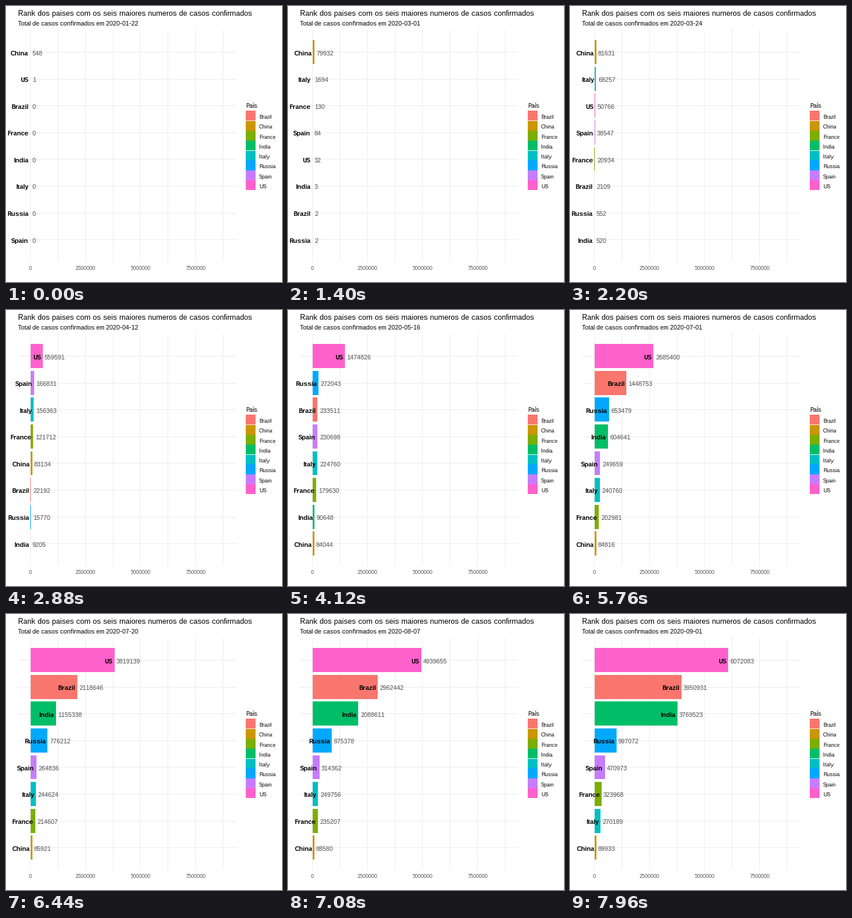
A matplotlib script for the animation above (8 s loop, 480 by 480 pixels).

```python
import numpy as np
import matplotlib as mpl
import matplotlib.pyplot as plt
from matplotlib.animation import FuncAnimation
from matplotlib.patches import Rectangle

mpl.rcParams["font.family"] = ["Liberation Sans", "DejaVu Sans"]
mpl.rcParams["text.hinting"] = "native"
mpl.rcParams["text.hinting_factor"] = 1

SIZE = 480
FRAMES = 200
LAST_DAY = 223
START = np.datetime64("2020-01-22")

# Cumulative counts on a few days; growth is exponential in between.
DAYS = [0, 9, 22, 34, 39, 46, 53, 60, 67, 74, 81, 98, 115, 138, 161, 180, 198, 223]
COUNTS = {
    "Brazil": [0, 0, 0, 0, 2, 20, 162, 1593, 4256, 11130, 22192, 79685,
               233511, 707412, 1448753, 2118646, 2962442, 3950931],
    "China": [548, 9802, 59895, 77754, 79932, 80823, 81003, 81435, 82122,
              82602, 83134, 83944, 84044, 84195, 84816, 85921, 88580, 89933],
    "France": [0, 5, 11, 14, 130, 1126, 4513, 16044, 40708, 71412, 121712,
               166543, 179630, 191313, 202981, 214607, 235207, 323968],
    "India": [0, 1, 3, 3, 3, 39, 113, 396, 1024, 3588, 9205, 33062, 90648,
              265928, 604641, 1155338, 2088611, 3769523],
    "Italy": [0, 2, 3, 322, 1694, 7375, 24747, 59138, 97689, 128948, 156363,
              203591, 224760, 235278, 240760, 244624, 249756, 270189],
    "Russia": [0, 2, 2, 2, 2, 17, 63, 367, 1534, 5389, 15770, 99399, 272043,
               476043, 653479, 776212, 875378, 997072],
    "Spain": [0, 0, 2, 6, 84, 673, 7798, 28768, 80110, 131646, 166831,
              212917, 230698, 241717, 249659, 264836, 314362, 470973],
    "US": [1, 8, 13, 15, 32, 518, 3499, 33746, 140909, 337573, 559591,
           1039909, 1474826, 1960642, 2685400, 3819139, 4939655, 6072083],
}
COLORS = dict(zip(COUNTS, ["#F8766D", "#CD9600", "#7CAE00", "#00BE67",
                           "#00BFC4", "#00A9FF", "#C77CFF", "#FF61CC"]))

X0 = 42.5
PX = 95.7 / 2.5e6
ROW0, ROW = 80.3, 46.55
BAR = 41.9
GRID = "#EBEBEB"
GREY = "#4D4D4D"

fig = plt.figure(figsize=(SIZE / 72, SIZE / 72), dpi=72, facecolor="white")
ax = fig.add_axes([0, 0, 1, 1])
ax.set_xlim(0, SIZE)
ax.set_ylim(SIZE, 0)
ax.axis("off")


def box(x, y, w, h, color, z=1):
    return ax.add_patch(Rectangle((x, y), w, h, fc=color, lw=0, zorder=z,
                                  antialiased=False))


def label(x, y, s, size, color="black", **kw):
    return ax.text(x, y, s, fontsize=size, color=color, va="baseline",
                   zorder=5, **kw)


def row_y(i):
    return ROW0 + ROW * i


# Grid and axis
for i in range(8):
    box(21, round(row_y(i)), 379, 1, GRID)
for i in range(8):
    box(int(X0 + i * 1.25e6 * PX), 41, 1, 404, GRID)
for i in range(4):
    label(X0 + i * 2.5e6 * PX, 459, str(i * 2500000), 9, GREY, ha="center")

# Titles and legend
label(21, 17, "Rank dos paises com os seis maiores numeros de casos confirmados", 13)
subtitle = label(21, 34, "", 11)
label(417, 177, "País", 11)
for i, (name, color) in enumerate(COLORS.items()):
    top = 182 + 17.28 * i
    box(417, round(top), 17, round(top + 17.28) - round(top), color)
    label(440, round(top + 14), name, 9)
for i in (1, 4):
    box(417, round(182 + 17.28 * i), 17, 1, "#F4F4F4", 2)

bars = {n: box(43, 0, 0, 0, c, 3) for n, c in COLORS.items()}
names = {n: label(0, 0, n, 11, weight="bold", ha="right") for n in COUNTS}
values = {n: label(0, 0, "", 11, GREY) for n in COUNTS}


def count(name, day):
    logs = np.log1p(COUNTS[name])
    return int(round(np.expm1(np.interp(day, DAYS, logs))))


def update(frame):
    day = int(round(frame * LAST_DAY / (FRAMES - 1)))
    subtitle.set_text(f"Total de casos confirmados em {START + day}")
    totals = {n: count(n, day) for n in COUNTS}
    ranked = sorted(totals, key=lambda n: (-totals[n], n))
    for i, n in enumerate(ranked):
        end = X0 + totals[n] * PX
        right = round(end)
        left = min(43, right - 1)
        top = round(row_y(i) - BAR / 2)
        bars[n].set_bounds(left, top, right - left, round(row_y(i) + BAR / 2) - top)
        bars[n].set_visible(totals[n] > 11000)
        base = round(row_y(i) + 5.4)
        names[n].set_position((round(end - 3.3), base))
        values[n].set_position((round(end + 3.5), base))
        values[n].set_text(str(totals[n]))
    return [subtitle, *bars.values(), *names.values(), *values.values()]


anim = FuncAnimation(fig, update, frames=FRAMES, interval=40, repeat=True,
                     repeat_delay=0, blit=False)
plt.show()
```
